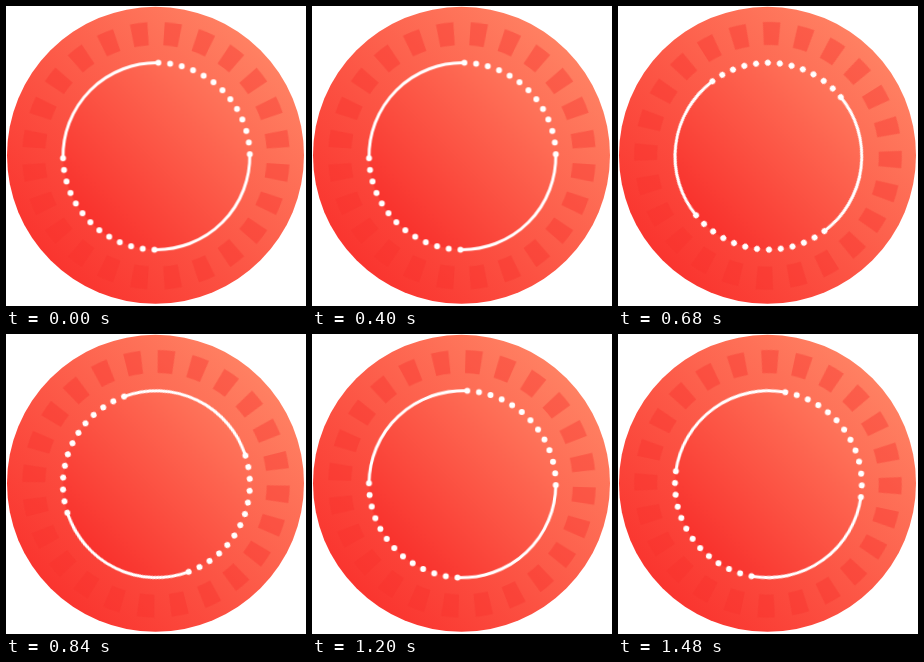
An HTML page for the animation above (1520 ms loop, 300 px wide and 300 px high).

```html
<!DOCTYPE html>
<html lang="en">
<head>
<meta charset="utf-8">
<title>Spinning dial</title>
<style>
  html, body { margin: 0; width: 100%; height: 100%; overflow: hidden; background: #fff; }
  svg { display: block; width: 100vw; height: 100vh; }
  .ring, .blocks { animation: 1520ms infinite; }
  .ring { animation-name: ring; }
  .blocks { animation-name: blocks; }

  /* Three turns of 400, 600 and 520 ms, held in 40 ms steps */
  @keyframes ring {
    0%      { transform: rotate(0deg); animation-timing-function: steps(5); }
    13.157% { transform: rotate(-245.4deg); animation-timing-function: steps(5); }
    26.315% { transform: rotate(-360deg); animation-timing-function: steps(7); }
    44.736% { transform: rotate(-578deg); animation-timing-function: steps(8); }
    65.789% { transform: rotate(-720deg); animation-timing-function: steps(5); }
    78.947% { transform: rotate(-898.2deg); animation-timing-function: steps(7); }
    97.368% { transform: rotate(-1070.8deg); animation-timing-function: steps(1); }
    100%    { transform: rotate(-1080deg); }
  }
  @keyframes blocks {
    0%      { transform: rotate(0deg); animation-timing-function: steps(5); }
    13.157% { transform: rotate(-245deg); animation-timing-function: steps(5); }
    26.315% { transform: rotate(-360deg); animation-timing-function: steps(7); }
    44.736% { transform: rotate(-575.9deg); animation-timing-function: steps(8); }
    65.789% { transform: rotate(-720deg); animation-timing-function: steps(5); }
    78.947% { transform: rotate(-902.2deg); animation-timing-function: steps(7); }
    97.368% { transform: rotate(-1071.7deg); animation-timing-function: steps(1); }
    100%    { transform: rotate(-1080deg); }
  }
</style>
</head>
<body>
<svg viewBox="0 0 300 300">
  <defs>
    <linearGradient id="disc" x1=".15" y1=".85" x2=".85" y2=".15">
      <stop offset="0" stop-color="#fa352f"/>
      <stop offset="1" stop-color="#ff8062"/>
    </linearGradient>
    <linearGradient id="face" x1=".15" y1=".85" x2=".85" y2=".15">
      <stop offset="0" stop-color="#f9322d"/>
      <stop offset="1" stop-color="#ff755b"/>
    </linearGradient>
    <g id="half" fill="none" stroke="#fff" stroke-linecap="round">
      <path d="M1.96-93.38A93.4 93.4 0 0 1 93.38-1.96" stroke-width="6" pathLength="12.001" stroke-dasharray="0 1"/>
      <path d="M93.38-1.96A93.4 93.4 0 0 1-1.96 93.38" stroke-width="3"/>
    </g>
  </defs>
  <circle cx="149.5" cy="149.3" r="148.5" fill="url(#disc)"/>
  <g transform="translate(150 149.8)">
    <g class="blocks">
      <circle r="122.3" transform="rotate(3.75)" fill="none" stroke="#f7302c" stroke-opacity=".4" stroke-width="23" pathLength="48" stroke-dasharray="1 1"/>
    </g>
  </g>
  <g transform="translate(150.4 150.2)">
    <circle r="93.4" fill="url(#face)"/>
    <g class="ring">
      <use href="#half"/>
      <use href="#half" transform="rotate(180)"/>
    </g>
  </g>
</svg>
</body>
</html>
```
